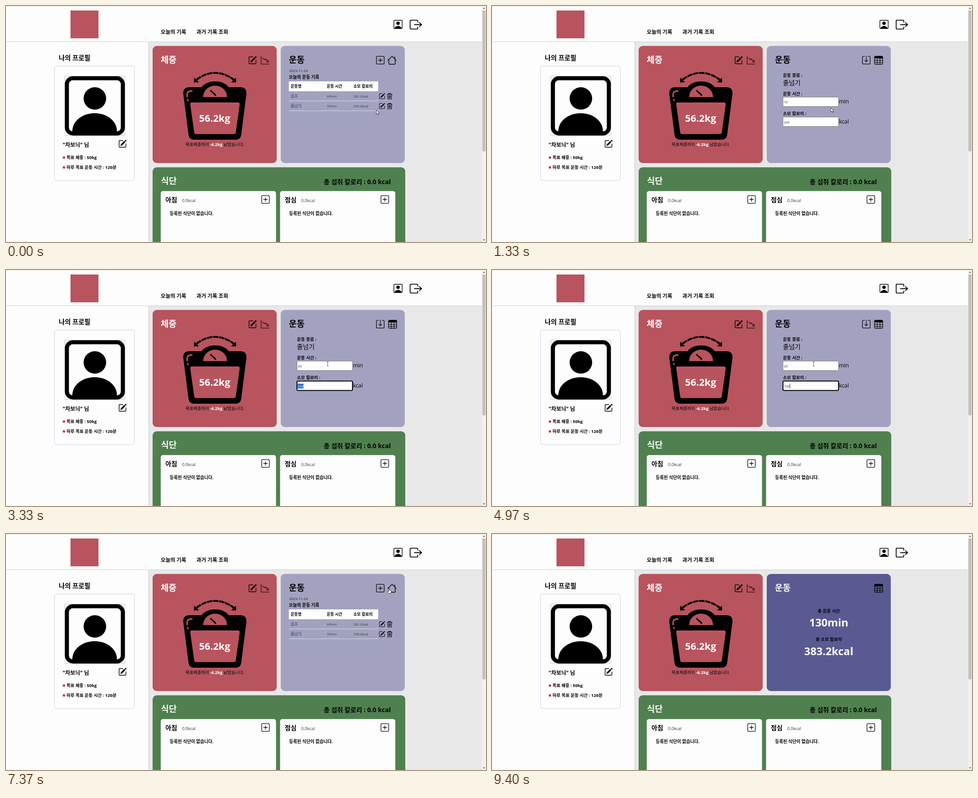
Write an HTML page that moves like this. It is 1064 px wide and 526 px high and loops after 9430 ms.

```html
<!DOCTYPE html>
<html lang="ko">
<head>
<meta charset="utf-8">
<title>건강 기록</title>
<style>
html, body { margin: 0; width: 100%; height: 100%; overflow: hidden; background: #fdfdfd; }
svg { display: block; width: 100vw; height: 100vh; }
text { font-family: "Open Sans", "Noto Sans CJK KR", "Noto Sans CJK", sans-serif; white-space: pre; }
.b { font-weight: 700; }
</style>
</head>
<body>
<svg id="stage" viewBox="0 0 1064 526"></svg>
<script>
const LOOP = 9430;
const RED = '#b8545e', GREEN = '#50804f', PURPLE = '#5a5a93', LAVENDER = '#a2a2c0', WHITE = '#fdfdfd';

const rect = (x, y, w, h, fill, rx = 0, extra = '') =>
  `<rect x="${x}" y="${y}" width="${w}" height="${h}" rx="${rx}" fill="${fill}" ${extra}/>`;
const text = (x, y, size, str, { fill = '#000', bold = true, anchor = 'start', id = '' } = {}) =>
  `<text ${id && `id="${id}"`} x="${x}" y="${y}" font-size="${size}" fill="${fill}" text-anchor="${anchor}"${bold ? ' class="b"' : ''}>${str}</text>`;
const line = (d, color = '#000', width = 1) =>
  `<path d="${d}" fill="none" stroke="${color}" stroke-width="${width}"/>`;
const solid = (d, fill = '#000') => `<path d="${d}" fill="${fill}"/>`;
const group = (id, body) => `<g id="${id}">${body}</g>`;

// Icons live on a 16 unit grid.
const box = rect(.6, .6, 14.8, 14.8, 'none', 1.6, 'stroke="#000" stroke-width="1.1"');
const ICONS = {
  pencil: line('M9 1.5H2.5a1 1 0 0 0-1 1v11a1 1 0 0 0 1 1h11a1 1 0 0 0 1-1V7.5', '#000', 1.2) +
    solid('M15.6 1.9 14.1.4a.5.5 0 0 0-.7 0l-1.1 1.1 2.2 2.2 1.1-1.1a.5.5 0 0 0 0-.7zM13.8 4.4l-2.2-2.2L4.9 8.9l-1 3.2 3.2-1z'),
  graph: line('M.5 0v15.5H16M3 3l4 4 2-2 5 6M14.5 7.5v4h-4'),
  plus: box + line('M8 4v8M4 8h8', '#000', 1.1),
  house: line('M.6 8.6 8 1.2l7.4 7.4M2.5 7v7a1 1 0 0 0 1 1h9a1 1 0 0 0 1-1V7M12.7 1.8V5.6', '#000', 1.1),
  table: box + solid('M0 2a2 2 0 0 1 2-2h12a2 2 0 0 1 2 2v2.4H0z') +
    line('M0 8.2h16M0 12h16M5.4 4v12M10.6 4v12'),
  save: line('M5 .6H2A1.4 1.4 0 0 0 .6 2v12A1.4 1.4 0 0 0 2 15.4h12a1.4 1.4 0 0 0 1.4-1.4V2A1.4 1.4 0 0 0 14 .6h-3M8 0v11M4.8 7.9 8 11.1l3.2-3.2', '#000', 1.1),
  trash: line('M1.5 3h13M5.5 3V1h5v2M2.7 3l.8 12.4h9L13.3 3M5.8 5.3l.3 7.8M8 5.3v7.8M10.2 5.3l-.3 7.8', '#000', 1.2),
  logout: line('M10.5 5.2V3a.8.8 0 0 0-.8-.8H1.3a.8.8 0 0 0-.8.8v10a.8.8 0 0 0 .8.8h8.4a.8.8 0 0 0 .8-.8v-2.2M5.7 8h9.6M12.4 4.9 15.5 8l-3.1 3.1', '#000', 1.05),
  person: box + '<circle cx="8" cy="6" r="3"/>' + solid('M2 15.5c0-3 3-4.8 6-4.8s6 1.8 6 4.8z')
};
const icon = (name, x, y, size) =>
  `<g transform="translate(${x} ${y}) scale(${size / 16})">${ICONS[name]}</g>`;

const pin = y => `<g transform="translate(124 ${y})">` + line('M.6 7.6 3.6 4.4', '#8a8f96', .8) +
  solid('M4.3.3 7.9 3.9 7 4.3 5.9 5.6l-.2 2L.5 3l2-.2L3.9 1.3z', '#d3203a') + '</g>';

function header() {
  return rect(0, 0, 1064, 80, WHITE) + line('M0 .5H1055', '#e8e8dc') + line('M0 79.5H1055', '#cfcfe2') +
    rect(143, 10, 62, 62, RED) +
    text(343, 62, 11.6, '오늘의 기록') + text(422, 62, 11.7, '과거 기록 조회') +
    icon('person', 859, 31, 20) + icon('logout', 895, 28, 27);
}

function sidebar() {
  return rect(0, 80, 316, 446, WHITE) + line('M316.5 80V526', '#c9c9d0') +
    text(117, 121, 14.4, '나의 프로필') +
    rect(107.5, 133.5, 177, 255.5, 'none', 4, 'stroke="#cfcfe6"') +
    rect(130.5, 156.5, 133, 132, 'none', 0, 'stroke="#c4c4c4"') +
    rect(135, 161, 124, 123, 'none', 13, 'stroke="#000" stroke-width="9"') +
    '<circle cx="197" cy="206" r="25"/>' +
    solid('M147 288.5V280C147 256 169 239 196.500 239S246 256 246 280V288.500Z') +
    text(125.500, 314, 12, '"차보늬" 님') + icon('pencil', 249, 298, 18.5) +
    pin(334) + text(134, 341, 9.5, '목표 체중 : 50kg') +
    pin(356) + text(134, 363, 9.6, '하루 목표 운동 시간 : 120분');
}

function scale() {
  return line('M421 165Q463.500 133 506 165', '#000', 4.2).replace('/>', ' stroke-dasharray="8.500 5" stroke-dashoffset="-3" stroke-linecap="round"/>') +
    solid('M417 159.500V170.500L428 170ZM510 159.500V170.500L499 170Z') +
    solid('M407 181H433Q444 168 463.500 168T494 181H519Q534 181 533 196L521.500 286Q520 298 509 298H417Q406 298 404.500 286L393 196Q392 181 407 181Z') +
    solid('M437 203A26.500 25.500 0 0 1 490 203Z', RED) +
    solid('M412 215H514Q518.500 215 518 219.500L509.500 281Q509 285.500 504.500 285.500H422Q417.500 285.500 417 281L408.500 219.500Q408 215 412 215Z', RED) +
    '<g stroke-linecap="round">' + line('M412 189.500Q400 188.500 401.500 202M403 208.500l.4 2', RED, 3.2) +
    line('M454 189 464.500 198.500', '#000', 3.2) + '</g>';
}

function weightCard() {
  return rect(325, 89, 275, 261, RED, 9) +
    text(343, 127, 19, '체중', { fill: WHITE }) +
    icon('pencil', 537, 111.500, 19) + icon('graph', 565, 112, 18) + scale() +
    text(462.500, 258, 21.7, '56.2kg', { fill: WHITE, anchor: 'middle' }) +
    text(463, 311.500, 9.4, `목표체중까지 <tspan class="b" fill="${WHITE}">-6.2kg</tspan> 남았습니다.`, { bold: false, anchor: 'middle' });
}

const meal = (x, name) => rect(x, 412.500, 255.500, 130, WHITE, 5) +
  text(x + 10.500, 437, 14, name) +
  text(x + 47, 437, 9.4, '0.0kcal', { bold: false, fill: '#333' }) +
  icon('plus', x + 223, 422, 18.5) +
  text(x + 20, 465.500, 9.7, '등록된 식단이 없습니다.');

function dietCard() {
  return rect(325, 359.500, 560, 200, GREEN, 9) +
    text(343.500, 397, 19, '식단', { fill: WHITE }) +
    text(853, 397, 14.1, '총 섭취 칼로리 : 0.0 kcal', { anchor: 'end' }) +
    meal(343, '아침') + meal(607.500, '점심');
}

const row = (y, name, time, kcal, id) => {
  const soft = { bold: false, fill: '#3a3a44' };
  return text(631, y, 8.7, name, soft) + text(711, y, 7.5, time, soft) +
    text(770, y, 7.5, kcal, { ...soft, id }) +
    line(`M627 ${y + 7.500}H825`, '#dcdce4') +
    icon('pencil', 826.500, y - 10, 14) + icon('trash', 843.500, y - 10, 14);
};

const tableView = text(627.500, 147, 7.9, '2023-11-24', { bold: false, fill: '#222' }) +
  text(627, 161.500, 9.7, '오늘의 운동 기록') +
  rect(627, 168, 198, 22, WHITE) +
  text(631, 182, 8.7, '운동명') + text(711, 182, 8.7, '운동 시간') + text(770, 182, 8.8, '소모 칼로리') +
  row(204, '골프', '60min', '283.2kcal', '') + row(226, '줄넘기', '70min', '200.0kcal', 'rowKcal') +
  icon('plus', 820.500, 111.500, 18.5) + icon('house', 845.500, 110.500, 20.5);

const field = (y, label, unit, id) => text(645, y, 9.6, label) +
  rect(645, y + 4.500, 123, 21, WHITE, 1, `id="${id}Box"`) +
  rect(646.500, y + 10.500, 13, 10.500, '#2f64c8', 0, `id="${id}Mark"`) +
  text(647, y + 18.500, 7.4, '', { bold: false, id }) +
  line(`M0 ${y + 10.500}v10.500`, '#000', .8).replace('<path', `<path id="${id}Caret"`) +
  text(769, y + 18.500, 12.3, unit, { bold: false });

const formView = text(645, 157.500, 9.6, '운동 종류 :') +
  text(645, 176, 14.1, '줄넘기', { bold: false }) +
  field(198.500, '운동 시간 :', 'min', 'time') + field(243, '소모 칼로리 :', 'kcal', 'burn') +
  icon('save', 820.500, 111.500, 18.5) + icon('table', 847.500, 111.500, 19);

const mid = { anchor: 'middle' };
const summaryView = text(746.500, 174.500, 9.6, '총 운동 시간', mid) +
  text(746.500, 206, 23.7, '130min', { ...mid, fill: WHITE }) +
  text(746.500, 238, 9.6, '총 소모 칼로리', mid) +
  text(746.500, 270, 23.7, '383.2kcal', { ...mid, fill: WHITE }) +
  icon('table', 847.500, 111.500, 19);

const scrollbar = rect(1055, 0, 9, 526, '#f1f1f1') + rect(1056, 10, 7, 314, '#c1c1c1') +
  solid('M1057 6.500h5l-2.500-3z', '#707070') + solid('M1057 520h5l-2.500 3z', '#707070');

const pointers =
  group('arrow', '<path d="M0 0V9.300L2.200 7.300 3.700 10.600 5.200 9.900 3.800 6.800H6.700Z" fill="#fff" stroke="#000" stroke-width=".7"/>') +
  group('hand', '<path d="M-.9.8Q0-.5.9.8V4.200L4.300 5Q5.300 5.300 5.200 6.500L4.600 9.500 4 11.500H-.8L-3.500 7.500Q-3.700 6-2.300 6.400L-.9 7.500Z" fill="#fff" stroke="#000" stroke-width=".7"/>') +
  group('beam', line('M-2-4.500H-.5L0-4 .5-4.500H2M0-4V4.500M-2 5H-.5L0 4.500 .5 5H2', '#333', .8));

const stage = document.getElementById('stage');
stage.innerHTML = rect(0, 0, 1064, 526, '#e8e8e8') + header() + sidebar() + weightCard() + dietCard() +
  rect(609, 89, 275, 261, LAVENDER, 9, 'id="panel"') +
  text(627, 127, 19, '운동', { id: 'title' }) +
  group('table', tableView) + group('form', formView) + group('summary', summaryView) +
  scrollbar + group('pointer', pointers);

const $ = id => document.getElementById(id);
const show = (id, on) => $(id).setAttribute('visibility', on ? 'inherit' : 'hidden');
const set = (id, attrs) => Object.entries(attrs).forEach(([k, v]) => $(id).setAttribute(k, v));

// [time, x, y] stops; the pointer eases between them.
const PATH = [
  [0, 821, 232], [450, 832, 222], [850, 832, 222], [1330, 751, 227], [1800, 713, 209],
  [5300, 713, 209], [6150, 831, 118], [6650, 831, 118], [7150, 849, 121], [7700, 849, 121],
  [8700, 805, 40], [9050, 785, -14], [LOOP, 785, -14]
];
// The last entry whose start time has passed.
const at = (steps, t) => steps.reduce((v, [start, value]) => t >= start ? value : v, steps[0][1]);

const VIEWS = [[0, 'table'], [800, 'form'], [6500, 'table'], [7650, 'summary']];
const SHAPES = [[0, 'arrow'], [250, 'hand'], [800, 'arrow'], [1450, 'beam'], [5450, 'arrow'],
  [6050, 'hand'], [6500, 'hand'], [7650, 'arrow']];
const FOCUS = [[0, ''], [1950, 'time'], [3050, 'burn'], [6250, '']];
const TIME = [[0, '70'], [2450, '2'], [2650, '20']];
const BURN = [[0, '200'], [3900, '1'], [4150, '10'], [4350, '100']];

function pointerAt(t) {
  const i = Math.max(1, PATH.findIndex(p => p[0] > t));
  const [t0, x0, y0] = PATH[i - 1], [t1, x1, y1] = PATH[i];
  const u = (t - t0) / (t1 - t0), e = u * u * (3 - 2 * u);
  return [x0 + (x1 - x0) * e, y0 + (y1 - y0) * e];
}

function drawField(id, value, focused, selected, blink) {
  $(id).textContent = value;
  set(id, { fill: selected ? '#fff' : '#333' });
  set(id + 'Box', { stroke: focused ? '#000' : '#767676', 'stroke-width': focused ? 2 : 1, rx: focused ? 2 : 1 });
  set(id + 'Mark', { width: value.length * 4.3 });
  show(id + 'Mark', selected);
  set(id + 'Caret', { transform: `translate(${647.600 + value.length * 4.25} 0)` });
  show(id + 'Caret', focused && !selected && blink);
}

function draw(t) {
  const view = at(VIEWS, t), focus = at(FOCUS, t), shape = at(SHAPES, t);
  for (const v of ['table', 'form', 'summary']) show(v, v === view);
  for (const s of ['arrow', 'hand', 'beam']) show(s, s === shape);
  const summary = view === 'summary';
  set('panel', { fill: summary ? PURPLE : LAVENDER });
  set('title', { fill: summary ? WHITE : '#000' });
  $('rowKcal').textContent = t < 6500 ? '200.0kcal' : '100.0kcal';

  const form = view === 'form';
  const blink = t < 4350 || (t - 4350) % 1060 < 700;
  drawField('time', at(TIME, t), form && focus === 'time', form && focus === 'time' && t < 2450, blink);
  drawField('burn', at(BURN, t), form && focus === 'burn', form && focus === 'burn' && t < 3900, blink);

  const [x, y] = pointerAt(t);
  set('pointer', { transform: `translate(${x.toFixed(1)} ${y.toFixed(1)})` });
}

const begin = performance.now();
function tick() {
  draw((performance.now() - begin) % LOOP);
  requestAnimationFrame(tick);
}
tick();
</script>
</body>
</html>
```
